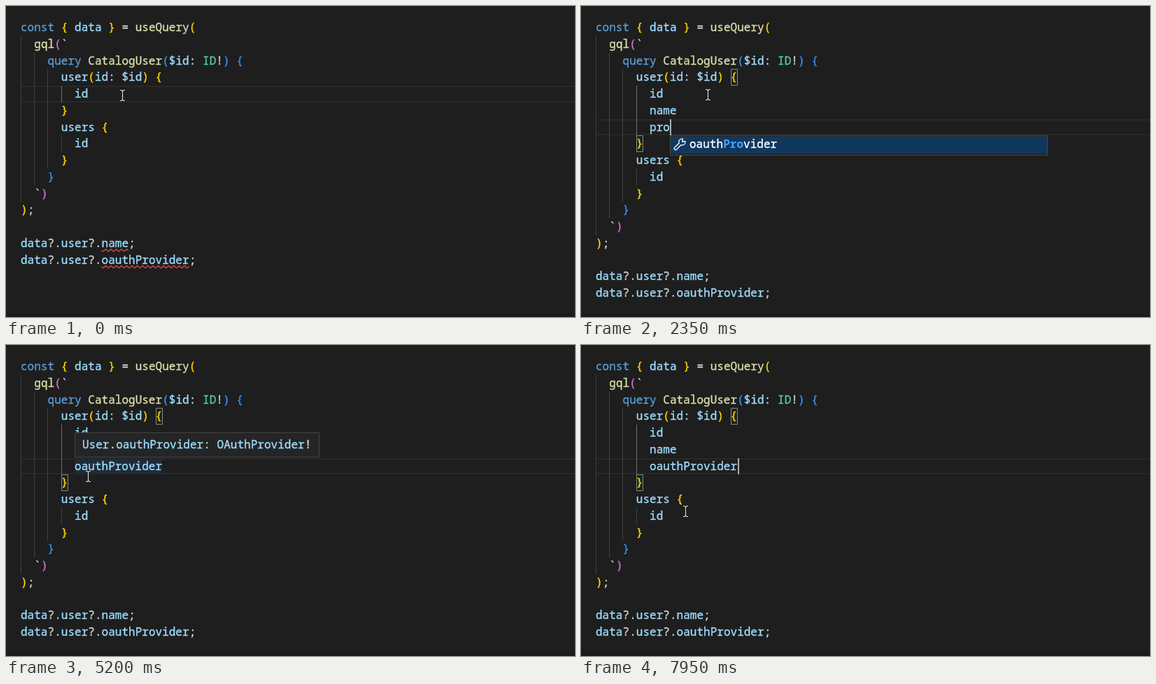
Write an HTML page with a canvas that moves like this. It is 813 px wide and 445 px high and loops after 8000 ms.

```html
<!DOCTYPE html>
<html lang="en">
<head>
<meta charset="utf-8">
<title>Typed query autocomplete</title>
<style>
  html, body { margin: 0; width: 100%; height: 100%; overflow: hidden; background: #1e1e1e; }
  canvas { display: block; }
</style>
</head>
<body>
<canvas id="stage" width="813" height="445"></canvas>
<script>
const ctx = document.getElementById('stage').getContext('2d');
const W = 813, H = 445, LOOP = 8000, STEP = 50;
const LEFT = 21, TOP = 19, CHAR = 9.63, LINE = 23.75;
const FONT = '16.05px "Noto Sans Mono", monospace';

const PLAIN = '#d4d4d4', NAME = '#9cdcfe', KEYWORD = '#569cd6', CALL = '#dcdcaa', TYPE = '#4ec9b0';
const BRACKETS = ['#ffd700', '#da70d6', '#3794ff'];
const WORDS = new Map([
  ['const', KEYWORD], ['query', KEYWORD], ['undefined', KEYWORD],
  ['useQuery', CALL], ['gql', CALL], ['CatalogUser', CALL],
  ['ID', TYPE], ['string', TYPE], ['property', PLAIN]
]);

const CODE = [
  'const { data } = useQuery(',
  '  gql(`',
  '    query CatalogUser($id: ID!) {',
  '      user(id: $id) {',
  '        id',
  '      }',
  '      users {',
  '        id',
  '      }',
  '    }',
  '  `)',
  ');',
  '',
  'data?.user?.name;',
  'data?.user?.oauthProvider;'
];

// Step tracks: [time, value]
const FIRST_FIELD = [[0, ''], [850, 'n'], [950, 'na'], [1050, 'nam'], [1200, 'name']];
const SECOND_FIELD = [[0, ''], [2150, 'p'], [2250, 'pr'], [2350, 'pro'], [2450, 'prov'], [2900, 'oauthProvider']];
const ADDED_LINES = [[0, 0], [600, 1], [1900, 2]];
const POPUP_OPEN = [[0, false], [900, true], [1750, false], [2200, true], [2900, false]];
const CARET_TOGGLES = [100, 450, 600, 1550, 1900, 3150, 3500, 4050, 4500, 5000, 5500, 6000, 6550, 7000, 7400];

const POINTER = [
  [0, 166.5, 128], [250, 181.5, 127],
  [3400, 181.5, 127], [3600, 93, 142], [3750, 111.5, 149],
  [4450, 111.5, 149], [4650, 115.5, 178],
  [5150, 115.5, 178], [5200, 117.5, 188],
  [5450, 117.5, 188], [6050, 152, 386],
  [6500, 152, 386], [6750, 154.5, 403],
  [7550, 154.5, 403], [7600, 158.5, 390],
  [7850, 158.5, 390], [7950, 149.5, 238]
];

const HOVERS = [
  { row: 5, col: 8, len: 4, from: 4000, fade: 4075, to: 4550, text: 'User.name: String!' },
  { row: 6, col: 8, len: 13, from: 4700, fade: 4725, to: 5550, text: 'User.oauthProvider: OAuthProvider!' },
  { row: 15, col: 12, len: 4, from: 6200, fade: 6125, to: 6650, text: '(property) name: string | undefined' },
  { row: 16, col: 12, len: 13, from: 7150, fade: 7125, to: 7900,
    text: '(property) oauthProvider: Types.CatalogOAuthProvider | undefined' }
];

const colX = col => LEFT + col * CHAR;
const rowY = row => TOP + Math.round(row * LINE);
const valueAt = (track, t) => track.filter(([time]) => time <= t).pop()[1];

function rect(color, x, y, w, h) {
  ctx.fillStyle = color;
  ctx.fillRect(x, y, w, h);
}

function frame(color, x, y, w, h) {
  ctx.strokeStyle = color;
  ctx.lineWidth = 1;
  ctx.strokeRect(x + .5, y + .5, w - 1, h - 1);
}

// A hairline outline gives the glyphs the heavier stems of editor text.
function text(str, x, y, color, weight = '') {
  ctx.font = `${weight} ${FONT}`;
  ctx.fillStyle = ctx.strokeStyle = color;
  ctx.lineWidth = .35;
  ctx.lineJoin = 'round';
  ctx.fillText(str, x, y);
  if (!weight) ctx.strokeText(str, x, y);
}

// Draws one highlighted line and returns the bracket depth after it.
function codeText(line, x, y, depth = null) {
  for (const { 0: token, index } of line.matchAll(/[\w$]+|[^\s\w$]/g)) {
    let color = /[\w$]/.test(token) ? WORDS.get(token) || NAME : PLAIN;
    if (depth !== null && /[(){}]/.test(token)) {
      const opens = '({'.includes(token);
      if (!opens) depth--;
      color = BRACKETS[depth % 3];
      if (opens) depth++;
    }
    text(token, x + index * CHAR, y, color);
  }
  return depth;
}

function guide(level, first, last, color = '#404040') {
  const y = rowY(first);
  rect(color, Math.round(colX(level * 2) - .1), y, 1, rowY(last + 1) - y);
}

function squiggle(row, col, len) {
  const x0 = colX(col), y = TOP + (row + 1) * LINE - 1.9;
  ctx.beginPath();
  for (let dx = 0; dx <= len * CHAR; dx += .5) {
    ctx.lineTo(x0 + dx, y + 1.4 * Math.cos((dx - 2.2) / 7.5 * 2 * Math.PI));
  }
  ctx.strokeStyle = '#f14c4c';
  ctx.lineWidth = 1.25;
  ctx.stroke();
}

function bracketBox(row, col) {
  const x = Math.round(colX(col)), y = rowY(row);
  rect('rgba(0,100,0,.1)', x, y, 10, 24);
  frame('#888888', x, y, 10, 24);
}

function wrench(x, y, back) {
  const line = (color, width) => {
    ctx.strokeStyle = color;
    ctx.lineWidth = width;
    ctx.beginPath();
    ctx.moveTo(-5.8, 5.8);
    ctx.lineTo(2, -2);
    ctx.stroke();
  };
  ctx.save();
  ctx.translate(x, y);
  ctx.lineCap = 'round';
  line('#e8e8e8', 5.4);
  ctx.beginPath();
  ctx.arc(3.4, -3.4, 4.6, -.25, -1.32);
  ctx.lineTo(3.6, -3.6);
  ctx.closePath();
  ctx.fillStyle = back;
  ctx.fill();
  ctx.strokeStyle = '#e8e8e8';
  ctx.lineWidth = 1.5;
  ctx.stroke();
  line(back, 2.4);
  ctx.restore();
}

function popup(row, col, label, start, matched) {
  const x = Math.round(colX(col)), y = Math.floor(TOP + (row + 1) * LINE);
  const selected = '#10385e';
  rect('#252526', x, y, 540, 29);
  frame('#454545', x, y, 540, 29);
  rect(selected, x + 1, y + 2, 538, 24);
  wrench(x + 14, y + 13, selected);
  const end = start + matched;
  const part = (from, to, color, weight) =>
    text(label.slice(from, to), x + 28 + from * CHAR, y + 18, color, weight);
  part(0, start, '#ffffff');
  part(start, end, '#45a4ff', 'bold');
  part(end, label.length, '#ffffff');
}

function tooltip(hover, t) {
  const alpha = Math.min(1, (t - hover.fade) / 125);
  if (alpha <= 0) return;
  const x = Math.floor(colX(hover.col));
  const y = Math.floor(TOP + hover.row * LINE) - 36;
  const w = Math.ceil(hover.text.length * CHAR + 22);
  ctx.globalAlpha = alpha;
  rect('#252526', x, y, w, 36);
  frame('#454545', x, y, w, 36);
  codeText(hover.text, x + 11, y + 23);
  ctx.globalAlpha = 1;
}

function pointerAt(t) {
  const next = POINTER.findIndex(([time]) => time > t);
  if (next < 0) return POINTER[POINTER.length - 1].slice(1);
  const [t0, x0, y0] = POINTER[next - 1], [t1, x1, y1] = POINTER[next];
  const u = (t - t0) / (t1 - t0), ease = u * u * (3 - 2 * u);
  return [x0 + (x1 - x0) * ease, y0 + (y1 - y0) * ease];
}

function pointer(t) {
  const [px, py] = pointerAt(t);
  ctx.save();
  ctx.translate(Math.floor(px) + .5, Math.round(py));
  ctx.beginPath();
  for (const s of [-1, 1]) {
    ctx.moveTo(-3.5, s * 7.5);
    ctx.lineTo(-1.5, s * 7.5);
    ctx.lineTo(0, s * 6.2);
    ctx.lineTo(1.5, s * 7.5);
    ctx.lineTo(3.5, s * 7.5);
  }
  ctx.moveTo(0, -6.5);
  ctx.lineTo(0, 6.5);
  ctx.strokeStyle = '#1e1e1e';
  ctx.lineWidth = 2.6;
  ctx.stroke();
  ctx.strokeStyle = '#e4e4e4';
  ctx.lineWidth = 1.1;
  ctx.stroke();
  ctx.restore();
}

function draw(t) {
  const added = valueAt(ADDED_LINES, t);
  const fields = [valueAt(FIRST_FIELD, t), valueAt(SECOND_FIELD, t)].slice(0, added);
  const lines = [...CODE];
  lines.splice(5, 0, ...fields.map(field => ' '.repeat(8) + field));
  const active = 4 + added, caretCol = lines[active].length;

  rect('#1e1e1e', 0, 0, W, H);
  rect('#1a1a1a', 0, 441, W, 4);
  rect('#282828', LEFT, rowY(active), W, 2);
  rect('#282828', LEFT, rowY(active + 1) - 2, W, 2);

  const hovers = HOVERS.filter(h => t >= h.from && t < h.to);
  for (const h of hovers) {
    const x = Math.floor(colX(h.col)), y = rowY(h.row);
    rect('#202b37', x, y, Math.round(h.len * CHAR), rowY(h.row + 1) - y);
  }

  guide(0, 1, 10 + added);
  guide(1, 2, 9 + added);
  guide(2, 3, 8 + added);
  guide(3, 4, active, '#707070');
  guide(3, 7 + added, 7 + added);

  if (t >= 100) {
    bracketBox(3, 20);
    bracketBox(active + 1, 6);
  }

  let depth = 0;
  lines.forEach((line, row) => { depth = codeText(line, LEFT, rowY(row) + 17, depth); });

  if (t < 1450) squiggle(13 + added, 12, 4);
  if (t < 2200) squiggle(14 + added, 12, 13);
  if (t >= 2750 && t < 3250) squiggle(active, 8, caretCol - 8);

  if (CARET_TOGGLES.filter(time => time <= t).length % 2) {
    rect('#aeafad', Math.round(colX(caretCol) + .3), rowY(active), 2, 23);
  }

  if (valueAt(POPUP_OPEN, t)) {
    const [label, start] = added === 1 ? ['name', 0] : ['oauthProvider', 5];
    popup(active, caretCol, label, start, caretCol - 8);
  }
  hovers.forEach(h => tooltip(h, t));
  pointer(t);
}

const began = performance.now();
function tick() {
  const t = (performance.now() - began) % LOOP;
  draw(Math.floor(t / STEP) * STEP);
  requestAnimationFrame(tick);
}
tick();
</script>
</body>
</html>
```
